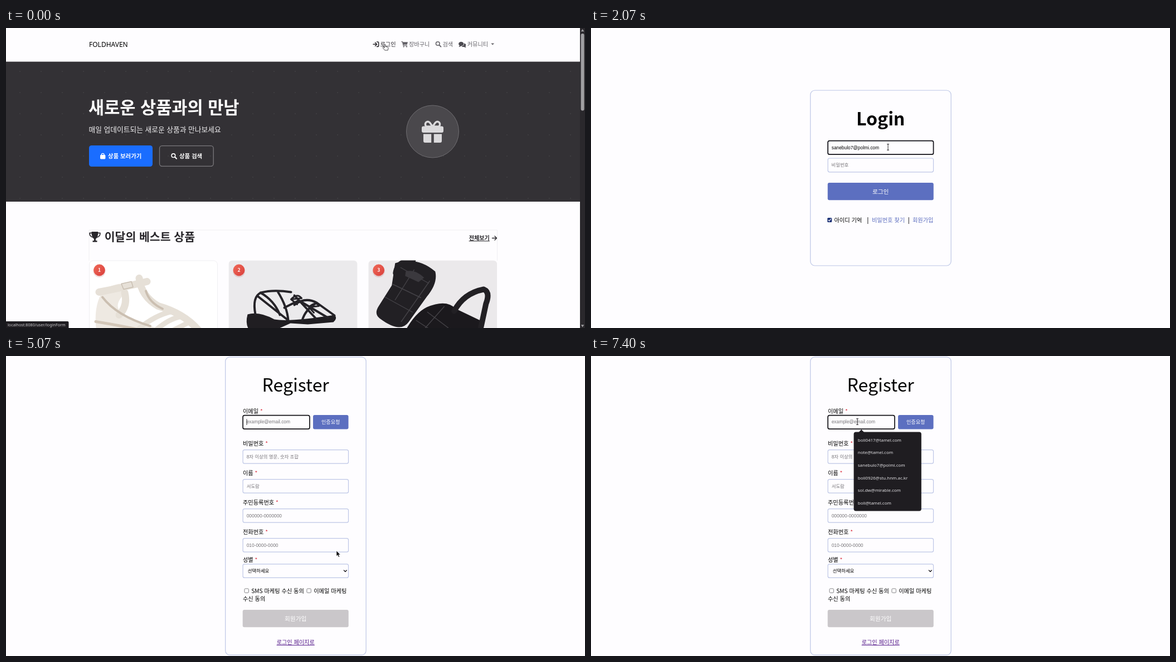
These frames come from a looping animation (1039x539 px, 8000 ms). An HTML page:

```html
<!DOCTYPE html>
<html lang="ko">
<head>
<meta charset="utf-8">
<title>Shop sign-up</title>
<style>
html, body { margin: 0; width: 100%; height: 100%; overflow: hidden; background: #fefdff; }
svg { display: block; width: 1039px; height: 539px; font: 10.2px "Noto Sans CJK KR", "Noto Sans CJK", sans-serif; }
.ui { font-family: "Noto Sans", "Open Sans", sans-serif; }
.field-text { font: 8.4px "Liberation Sans", "Noto Sans CJK KR", sans-serif; }
.hint { fill: #777579; }
.bold { font-weight: 700; }
.mid { text-anchor: middle; }
.white { fill: #fff; }
.link { fill: #5c6dbf; }
.underline { text-decoration: underline; }
.line { fill: none; stroke-linecap: round; stroke-linejoin: round; }
.card, .input { fill: #fefdff; stroke: #bdc6e6; stroke-width: 1.2; }
.focus { fill: none; stroke: #131217; stroke-width: 1.7; }
.box { fill: #fff; stroke: #77757a; stroke-width: .9; }
.star { fill: #dc3545; }
.dark { fill: #1f1d21; }

/* Every state shares one 8 s clock; step-end keeps the switches hard. */
.state { animation: 8s step-end infinite; }
.home { animation-name: home; }
.login { animation-name: login; }
.register { animation-name: register; }
.login-status { animation-name: login-status; }
.join-status { animation-name: join-status; }
.login-focus { animation-name: login-focus; }
.login-caret { animation-name: login-caret; }
.join-hover { animation-name: join-hover; }
.email-caret { animation-name: email-caret; }
.tooltip { animation: tooltip 8s linear infinite; }
.suggest { animation: suggest 8s linear infinite; }
.hand { animation-name: hand; }
.arrow { animation-name: arrow; }
.beam { animation-name: beam; }
.pointer { animation: pointer 8s linear infinite; }

@keyframes home { 0% { opacity: 1 } 14.125%, 100% { opacity: 0 } }
@keyframes login { 0% { opacity: 0 } 14.125% { opacity: 1 } 62.5%, 100% { opacity: 0 } }
@keyframes register { 0% { opacity: 0 } 62.5%, 100% { opacity: 1 } }
@keyframes login-status { 0% { opacity: 1 } 10%, 100% { opacity: 0 } }
@keyframes join-status { 0% { opacity: 0 } 46.7% { opacity: 1 } 56.2%, 100% { opacity: 0 } }
@keyframes login-focus { 0% { opacity: 1 } 49.1%, 100% { opacity: 0 } }
@keyframes login-caret {
  0% { opacity: 1 } 24.1% { opacity: 0 } 29.6% { opacity: 1 } 36.2% { opacity: 0 }
  42.8% { opacity: 1 } 49.1%, 100% { opacity: 0 }
}
@keyframes join-hover { 0% { opacity: 0 } 42.5%, 100% { opacity: 1 } }
@keyframes email-caret {
  0% { opacity: 1 } 70% { opacity: 0 } 74.1% { opacity: 1 } 80% { opacity: 0 }
  88.4% { opacity: 1 } 92%, 100% { opacity: 0 }
}
@keyframes tooltip { 0%, 69.9% { opacity: 0 } 70%, 79% { opacity: 1 } 79.9%, 100% { opacity: 0 } }
@keyframes suggest { 0%, 88.3% { opacity: 0 } 90%, 100% { opacity: 1 } }
@keyframes hand { 0% { opacity: 1 } 7.5% { opacity: 0 } 42.5% { opacity: 1 } 50.8%, 100% { opacity: 0 } }
@keyframes arrow {
  0% { opacity: 0 } 7.5% { opacity: 1 } 22.6% { opacity: 0 } 36% { opacity: 1 } 42.5% { opacity: 0 }
  50.8% { opacity: 1 } 64.1% { opacity: 0 } 76.6% { opacity: 1 } 79.8%, 100% { opacity: 0 }
}
@keyframes beam {
  0% { opacity: 0 } 22.6% { opacity: 1 } 36% { opacity: 0 } 64.1% { opacity: 1 }
  76.6% { opacity: 0 } 79.8%, 100% { opacity: 1 }
}
@keyframes pointer {
  0%, .8% { transform: translate(680px, 29px) }
  5% { transform: translate(685px, 32px) }
  14.5% { transform: translate(685px, 32px); animation-timing-function: ease-in-out }
  23.3%, 24.1% { transform: translate(533px, 243px) }
  25.8%, 32.4% { transform: translate(533px, 214px) }
  32.5%, 35.8% { transform: translate(533px, 226px) }
  38.375% { transform: translate(535px, 311px); animation-timing-function: ease-out }
  43.3%, 76.5% { transform: translate(593px, 350px) }
  76.6%, 78.9% { transform: translate(605px, 351px) }
  80%, 83% { transform: translate(487px, 111px) }
  86.6%, 100% { transform: translate(478px, 118px) }
}
</style>
</head>
<body>
<svg viewBox="0 0 1039 539">
  <defs>
    <pattern id="dots" width="38" height="38" patternUnits="userSpaceOnUse" x="6" y="59">
      <circle cx="19" cy="19" r=".9" fill="#fff" opacity=".07"/>
    </pattern>
    <linearGradient id="red" x2="1" y2="1">
      <stop stop-color="#f06a58"/><stop offset="1" stop-color="#d93f3c"/>
    </linearGradient>
    <clipPath id="photo"><rect width="231" height="140" rx="7"/></clipPath>
    <g id="lens" class="line">
      <circle r="3.3" stroke-width="1.6"/><path d="M2.6 2.6 5.6 5.6" stroke-width="2"/>
    </g>
    <g id="badge">
      <circle cy="2" r="11" fill="#a33" opacity=".16"/><circle r="10.4" fill="url(#red)"/>
    </g>
  </defs>

  <g class="state home">
    <text class="ui" x="149" y="34.3" font-size="12">FOLDHAVEN</text>
    <g fill="#66646a">
      <g fill="#2c2a2f">
        <path class="line" d="M659 29.2H665M662.5 26.2 665.5 29.2 662.5 32.2M665.5 25H667.5Q668.6 25 668.6 26V32.4Q668.6 33.4 667.5 33.4H665.5" stroke="#2c2a2f" stroke-width="1.6"/>
        <text x="671.5" y="33">로그인</text>
      </g>
      <path d="M711.5 25.3H721L719.7 30H712.5Z"/>
      <path class="line" d="M709.8 24.6H711.5L713 31.6H719.5" stroke="#66646a" stroke-width="1.2"/>
      <circle cx="713.6" cy="33.6" r="1.1"/><circle cx="719" cy="33.6" r="1.1"/>
      <text x="723" y="33">장바구니</text>
      <use href="#lens" x="774.8" y="28" stroke="#66646a"/>
      <text x="783.5" y="33">검색</text>
      <g fill="#4c4a50">
        <path d="M812.5 34 814 31.3A4.6 3.6 0 1 1 817 32Q815 34 812.5 34Z"/>
        <path d="M822 27.6Q825.8 28.4 825.3 31.5L824.4 32.8 825.6 34.9Q823.4 35 822 34Q818.4 34.4 817 32.8Q822.3 32.4 822 27.6Z"/>
      </g>
      <text x="827.7" y="33">커뮤니티</text>
      <path d="M870.3 27.6H876.2L873.2 30.6Z"/>
    </g>

    <path fill="#333135" d="M0 60.5H1030V312H0Z"/>
    <path fill="url(#dots)" d="M0 60.5H1030V312H0Z"/>
    <text class="bold white" x="148" y="154.3" font-size="30.6">새로운 상품과의 만남</text>
    <text x="148.5" y="187.2" font-size="12.75" fill="#f1f0f2">매일 업데이트되는 새로운 상품과 만나보세요</text>
    <rect x="149" y="211" width="114" height="38" rx="4.5" fill="#1a6dff"/>
    <rect x="169" y="228" width="9.4" height="7.4" rx="1.4" class="white"/>
    <path class="line" d="M171.4 229V227.5Q171.4 225.4 173.7 225.4T176 227.5V229" stroke="#fff" stroke-width="1.2"/>
    <text class="bold white" x="183" y="234" font-size="10.4">상품 보러가기</text>
    <rect x="275.5" y="211.7" width="96.7" height="36.6" rx="4.5" fill="none" stroke="#7b797d" stroke-width="1.3"/>
    <use href="#lens" x="300.4" y="229.2" stroke="#fff"/>
    <text class="bold white" x="311" y="234" font-size="10.4">상품 검색</text>
    <circle cx="765.5" cy="186" r="47" fill="#4a484c" stroke="#6f6d71"/>
    <g fill="#dbdadc">
      <rect x="746" y="176.5" width="39" height="11.5" rx="3"/>
      <path d="M749 190.5H763.2V206H752Q749 206 749 203ZM767.8 190.5H782V203Q782 206 779 206H767.8Z"/>
      <path class="line" d="M765.5 177 760.5 170Q757 167 753.7 169.5Q751 173 754 177ZM765.5 177 770.5 170Q774 167 777.3 169.5Q780 173 777 177Z" stroke="#dbdadc" stroke-width="3.4"/>
    </g>

    <path d="M149 418V363H881.5V418" fill="none" stroke="#f0eff2"/>
    <g fill="#29272b">
      <path d="M153.5 366H165.3Q165.5 376 161 379V382H163.5V384.5H155.5V382H158V379Q153.3 376 153.5 366Z"/>
      <path class="line" d="M153.5 368.4H150Q150 374.5 156 376M165.3 368.4H169Q169 374.5 163 376" stroke="#29272b" stroke-width="1.6"/>
      <text class="bold" x="176.7" y="382.8" font-size="20.5">이달의 베스트 상품</text>
      <text class="bold underline" x="830.7" y="381.3" font-size="10.1">전체보기</text>
      <path class="line" d="M872.5 377.5H880.5M877 374 880.5 377.5 877 381" stroke="#29272b" stroke-width="1.4"/>
    </g>

    <g transform="translate(149 417.5)">
      <rect x=".5" y=".5" width="230" height="140" rx="7" fill="#fff" stroke="#f0eff2"/>
      <g clip-path="url(#photo)" class="line" stroke="#e6e0d7">
        <path d="M13 125Q8 85 22 60Q30 46 55 42L62 62Q36 88 75 105L130 125Z" fill="#eee9e2" stroke="none"/>
        <path d="M18 57Q55 50 104 38M90 32Q94 65 124 82Q170 95 196 125M64 58Q70 82 54 98" stroke-width="13"/>
        <path d="M90 122Q120 98 148 92M120 125Q145 104 165 101M152 125 182 110" stroke-width="9"/>
        <path d="M24 66Q50 100 110 118M102 55Q108 76 132 87" stroke="#cbbfb1" stroke-width="4"/>
        <path d="M58 42 76 38 79 48 62 52Z" stroke="#c9bfb2" stroke-width="1.5"/>
        <path d="M12 110Q55 117 92 125" stroke="#d3c7b8" stroke-width="5"/>
      </g>
    </g>
    <g transform="translate(399.5 417.5)">
      <g clip-path="url(#photo)">
        <rect width="231" height="140" fill="#ebeaec"/>
        <path d="M34 97Q55 91 82 106Q110 111 190 98Q196 104 188 111L142 115 111 113 91 122H35Q30 112 34 97Z" fill="#201e22"/>
        <g class="line" stroke="#252328" stroke-width="4">
          <path d="M48 97Q42 65 58 58Q80 52 112 57M53 65 106 107M88 56Q105 83 107 108M57 58Q82 72 92 98M118 63 158 106M118 80Q137 65 158 76L190 99M132 108Q137 89 158 76M100 85 126 72 178 103"/>
          <path d="M112 70Q123 58 131 68L112 70 123 79M145 83Q157 73 162 82L144 84 153 94" stroke-width="3"/>
        </g>
      </g>
    </g>
    <g transform="translate(650.3 417.5)">
      <g clip-path="url(#photo)">
        <rect width="231" height="140" fill="#ebe9eb"/>
        <path d="M48 5Q88-8 120 20Q125 41 105 65L72 111Q57 132 20 104Q10 96 18 83L42 45Z" fill="#222024"/>
        <path d="M66 127Q84 94 105 84Q140 69 157 87L205 110 206 130Z" fill="#1b191d"/>
        <g class="line" stroke="#222024" stroke-width="10">
          <path d="M49 23Q52 1 80 0M154 91Q171 59 207 52Q219 57 211 78L202 120"/>
          <g stroke="#444247" stroke-width="1.4">
            <path d="M58 13 108 41M44 43 94 67M30 66 79 93M82 17 48 71M110 37 59 110M106 93 143 121M86 108 118 129M136 83 98 126"/>
          </g>
        </g>
        <path d="M67 20Q83 15 100 31L90 39 66 28Z" fill="#3b393e"/>
      </g>
    </g>
    <g class="bold mid white" font-size="8.6">
      <use href="#badge" x="167.5" y="435"/><text class="white" x="167.5" y="438.2">1</text>
      <use href="#badge" x="418" y="435"/><text class="white" x="418" y="438.2">2</text>
      <use href="#badge" x="668.7" y="435"/><text class="white" x="668.7" y="438.2">3</text>
    </g>

    <path fill="#2a282c" d="M1030 0H1039V539H1030Z"/>
    <rect x="1031.6" y="10" width="6" height="138.5" rx="3" fill="#a09fa2"/>
    <path fill="#a09fa2" d="M1031.8 6.2 1034.6 2 1037.4 6.2ZM1031.8 533.2 1034.6 537.4 1037.4 533.2Z"/>
    <g class="state login-status">
      <path class="dark" d="M0 527H110.5Q112.5 527 112.5 529V539H0Z"/>
      <text class="ui" x="3" y="536.3" font-size="7.2" fill="#c9c8cb">localhost:8080/user/loginForm</text>
    </g>
  </g>

  <g class="state login">
    <path fill="#fefdff" d="M0 0H1039V539H0Z"/>
    <rect class="card" x="393.7" y="112" width="252.4" height="315" rx="8"/>
    <text class="bold mid" x="519.7" y="174.5" font-size="32">Login</text>
    <rect class="input" x="425.1" y="202.6" width="189.4" height="24.6" rx="3"/>
    <rect class="input" x="425.1" y="234" width="189.4" height="24.8" rx="3"/>
    <rect class="focus state login-focus" x="425.1" y="202.6" width="189.4" height="24.6" rx="3"/>
    <text class="field-text" x="431.7" y="217.6">sanebulo7@polmi.com</text>
    <path class="state login-caret" d="M431.6 209.5H432.4V220H431.6Z"/>
    <text class="field-text hint" x="431.5" y="248.7">비밀번호</text>
    <rect x="424.7" y="278" width="190" height="31.3" rx="3" fill="#5c6fc0"/>
    <text class="mid white" x="519.7" y="298" font-size="10.7">로그인</text>
    <rect x="424.2" y="341" width="8" height="8" rx="1.5" fill="#1d3277"/>
    <path class="line" d="M426 345.2 427.5 346.8 430.4 343" stroke="#fff" stroke-width="1.2"/>
    <text x="436.5" y="349">아이디 기억</text>
    <path d="M496.3 340H497.3V352H496.3ZM569.7 340H570.7V352H569.7Z" fill="#242226"/>
    <text class="link" x="504" y="349">비밀번호 찾기</text>
    <text class="link" x="577" y="349">회원가입</text>
    <path class="state join-hover link" d="M577 350.2H614.7V351H577Z"/>
    <g class="state join-status">
      <path class="dark" d="M0 527H100Q102 527 102 529V539H0Z"/>
      <text class="ui" x="3" y="536.3" font-size="7.2" fill="#c9c8cb">localhost:8080/register/add</text>
    </g>
  </g>

  <g class="state register">
    <path fill="#fefdff" d="M0 0H1039V539H0Z"/>
    <rect class="card" x="393.7" y="1.8" width="252.4" height="535.4" rx="8"/>
    <text class="mid" x="519.7" y="63.5" font-size="32">Register</text>
    <text x="425" y="102.8">이메일 <tspan class="star">*</tspan></text>
    <text x="425" y="160.8">비밀번호 <tspan class="star">*</tspan></text>
    <text x="425" y="213.8">이름 <tspan class="star">*</tspan></text>
    <text x="425" y="266.8">주민등록번호 <tspan class="star">*</tspan></text>
    <text x="425" y="319.8">전화번호 <tspan class="star">*</tspan></text>
    <text x="425" y="370.3">성별 <tspan class="star">*</tspan></text>
    <rect class="focus" x="425.1" y="106.6" width="119.8" height="24.6" rx="3"/>
    <rect x="551" y="106" width="63.5" height="25.4" rx="3" fill="#5c6fc0"/>
    <text class="mid white" x="582.7" y="122.2" font-size="9.1" font-weight="500">인증요청</text>
    <rect class="input" x="425.1" y="168.6" width="189.4" height="24.6" rx="3"/>
    <rect class="input" x="425.1" y="221.6" width="189.4" height="24.6" rx="3"/>
    <rect class="input" x="425.1" y="274.6" width="189.4" height="24.6" rx="3"/>
    <rect class="input" x="425.1" y="327.6" width="189.4" height="24.6" rx="3"/>
    <rect class="input" x="425.1" y="373.8" width="189.4" height="24.6" rx="3"/>
    <g class="field-text hint">
      <text x="431.7" y="121.4">example@email.com</text>
      <text x="431.7" y="183.8">8자 이상의 영문, 숫자 조합</text>
      <text x="431.7" y="236.8">서도람</text>
      <text x="431.7" y="289.8">000000-0000000</text>
      <text x="431.7" y="342.6">010-0000-0000</text>
    </g>
    <path class="state email-caret" d="M431.6 113.3H432.4V124H431.6Z"/>
    <text x="433.8" y="388.8" font-size="8.4">선택하세요</text>
    <path class="line" d="M606.3 385 608.8 387.5 611.3 385" stroke="#1a181c" stroke-width="1.3"/>
    <rect class="box" x="428" y="418" width="7.4" height="7.4" rx="1.5"/>
    <text x="440.2" y="425.8">SMS 마케팅 수신 동의</text>
    <rect class="box" x="539.9" y="418" width="7.4" height="7.4" rx="1.5"/>
    <text x="552.2" y="425.8">이메일 마케팅</text>
    <text x="425" y="440.2">수신 동의</text>
    <rect x="424.7" y="456" width="190" height="31.3" rx="3" fill="#cac7ca"/>
    <text class="mid white" x="519.7" y="475.6" font-size="10.7">회원가입</text>
    <text class="mid underline" x="519.7" y="518" font-size="10.15" fill="#551a8b">로그인 페이지로</text>

    <g class="tooltip">
      <path class="dark" d="M599 359H692.5V375H599Z"/>
      <text x="603.7" y="370.2" font-size="8.4" fill="#b9b7bb">이 입력란을 작성하세요.</text>
    </g>
    <g class="suggest">
      <path class="dark" d="M480 137.5 485.2 132 490.4 137.5Z"/>
      <rect class="dark" x="471.5" y="136.6" width="121.3" height="142" rx="4"/>
      <g class="ui" font-size="7.9" fill="#e2e1e4">
        <text x="478.8" y="153.5">boli0417@tamel.com</text>
        <text x="478.8" y="176.2">note@tamel.com</text>
        <text x="478.8" y="198.9">sanebulo7@polmi.com</text>
        <text x="478.8" y="221.5">boli0926@stu.hnm.ac.kr</text>
        <text x="478.8" y="244.2">sol.dw@mirable.com</text>
        <text x="478.8" y="266.9">boli@tamel.com</text>
      </g>
    </g>
  </g>

  <g class="pointer">
    <path class="state hand" d="M-1 1Q0-.6 1 1V4.5L5 5.3Q6 5.6 6 6.8L5.2 11H-.2L-3.6 7Q-3-.0 -1 7Z" fill="#fff" stroke="#242226" stroke-width=".8"/>
    <path class="state arrow" d="M0 0V9.6L2.2 7.6 3.8 11.2 5.5 10.4 3.9 6.9H7Z" fill="#0c0b0d" stroke="#fff" stroke-width=".5"/>
    <path class="state beam line" d="M-1.6-5.3H1.6M0-5.3V5.3M-1.6 5.3H1.6" stroke="#1a181c" stroke-width=".9"/>
  </g>
</svg>
</body>
</html>
```
